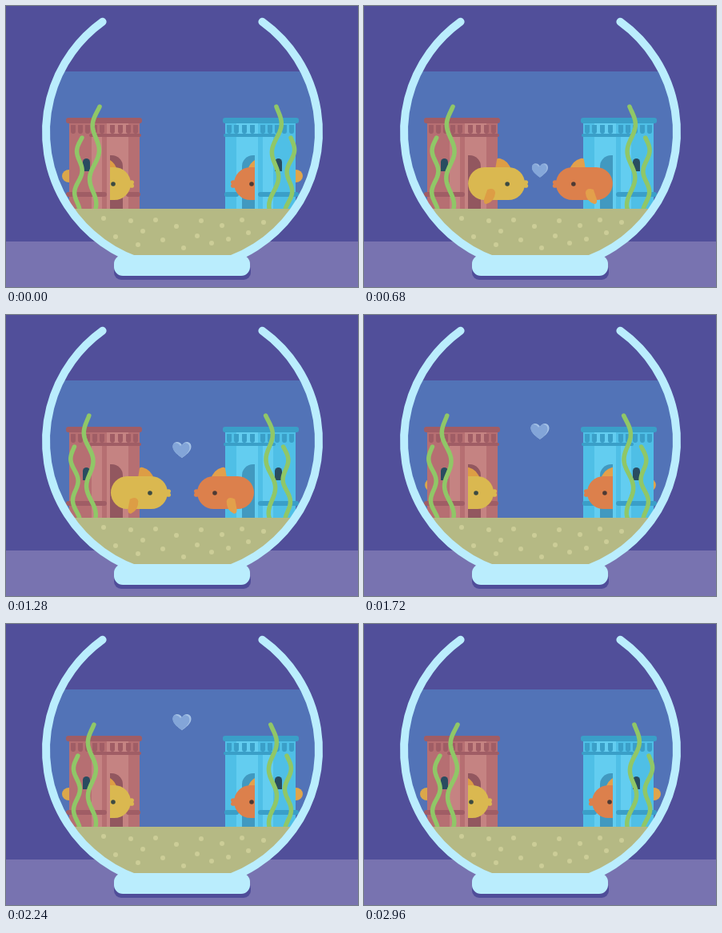
An HTML page with a canvas that plays this animation: 440x352 px, repeating every 3000 ms.

```html
<!DOCTYPE html>
<html>
<head>
<meta charset="utf-8">
<style>
html, body { margin: 0; width: 100%; height: 100%; overflow: hidden; background: #514f9a; }
canvas { display: block; }
</style>
</head>
<body>
<canvas id="stage" width="440" height="352"></canvas>
<script>
const ctx = document.getElementById('stage').getContext('2d');
const LOOP = 3000, STEP = 40, TAU = Math.PI * 2;
const BOWL = { x: 220.5, y: 158, r: 171 };
const RED = {
  wall: '#b66f72', light: '#c58382', dark: '#a05d65', door: '#92575f',
  body: '#dab850', fin: '#dd9d45', tail: '#dba74a', eye: '#3b4a42'
};
const BLUE = {
  wall: '#4fbfe6', light: '#63cdf0', dark: '#3a9fc8', door: '#4199c0',
  body: '#dc804c', fin: '#e3a04b', tail: '#dfa54b', eye: '#4d3a34'
};
const PEBBLES = [
  [122, 266], [137, 289], [156, 269], [165, 299], [171, 282], [187, 268],
  [196, 293], [213, 276], [222, 303], [239, 288], [244, 269], [257, 297],
  [270, 275], [278, 292], [295, 268], [303, 284], [322, 271]
];

const clamp = v => Math.max(0, Math.min(1, v));
const part = (t, a, b) => clamp((t - a) / (b - a));
const easeOut = x => 1 - (1 - x) ** 3;
const easeInOut = x => x < 0.5 ? 4 * x ** 3 : 1 - 4 * (1 - x) ** 3;

function rect(x, y, w, h, color) {
  ctx.fillStyle = color;
  ctx.fillRect(x, y, w, h);
}

function round(x, y, w, h, r, color) {
  ctx.fillStyle = color;
  ctx.beginPath();
  ctx.roundRect(x, y, w, h, r);
  ctx.fill();
}

function oval(x, y, rx, ry, color) {
  ctx.fillStyle = color;
  ctx.beginPath();
  ctx.ellipse(x, y, rx, ry, 0, 0, TAU);
  ctx.fill();
}

function clipTo(trace, draw) {
  ctx.save();
  ctx.beginPath();
  trace();
  ctx.clip();
  draw();
  ctx.restore();
}

function castle(c) {
  rect(79, 147, 47, 108, c.wall);
  rect(126, 147, 27, 108, c.light);
  rect(153, 147, 14, 108, c.wall);
  rect(107, 164, 13, 90, c.light);
  rect(120, 164, 6, 90, c.wall);
  for (const x of [81, 90, 99, 108, 117, 130, 140, 150, 159]) {
    round(x, 149, 6, 11, [0, 0, 3, 3], c.dark);
  }
  round(75, 140, 95, 7, 3, c.dark);
  round(104, 160, 65, 4, 2, c.dark);
  round(75, 233, 51, 6, 3, c.dark);
  round(150, 233, 18, 6, 3, c.dark);
  round(130, 187, 16, 68, [0, 14, 0, 0], c.door);
  round(96, 191, 9, 16, [4.5, 4.5, 0, 0], '#294c60');
}

// Horizontal place of the eye
function swim(t) {
  if (t < 1340) return 134 + 46 * easeOut(part(t, 0, 925));
  if (t < 1960) return 180 - 52 * easeInOut(part(t, 1340, 1960));
  return 128 + 6 * easeOut(part(t, 1960, 2300));
}

function fish(c, x, t) {
  ctx.fillStyle = c.fin;
  ctx.beginPath();
  ctx.moveTo(x - 15, 204);
  ctx.lineTo(x - 13, 192);
  ctx.quadraticCurveTo(x - 12, 190, x - 9, 191);
  ctx.quadraticCurveTo(x + 2, 194, x + 5, 206);
  ctx.fill();
  for (const dy of [-2.2, 2.2]) oval(x + 23, 223 + dy, 3, 2.6, c.body);
  round(x - 49, 202, 71, 41, 20.5, c.body);
  oval(x, 223, 2.8, 2.8, c.eye);
  ctx.save();
  ctx.translate(x - 20, 232);
  ctx.rotate(0.2 + 0.35 * Math.sin(TAU * t / 750));
  ctx.fillStyle = c.fin;
  ctx.beginPath();
  ctx.moveTo(-5, -2);
  ctx.quadraticCurveTo(4, -5, 5, 2);
  ctx.quadraticCurveTo(4, 13, -6, 16);
  ctx.quadraticCurveTo(-10, 16, -9, 10);
  ctx.fill();
  ctx.restore();
}

function home(c, t) {
  const x = swim(t);
  oval(x - 55, 213, 9, 8, c.tail);
  castle(c);
  clipTo(() => ctx.rect(130, 180, 100, 75), () => fish(c, x, t));
}

function weed(x0, top, amp, mid, wave, sway, flip) {
  ctx.beginPath();
  for (let y = top; y <= 260; y += 2) {
    const x = x0 + amp * Math.cos(TAU * (y - mid) / wave);
    const px = (flip ? 441 - x : x) + sway * (254 - y) / (254 - top);
    ctx.lineTo(px, y);
  }
  ctx.stroke();
}

function weeds(t) {
  const s = Math.cos(TAU * t / LOOP);
  ctx.strokeStyle = '#90c767';
  ctx.lineWidth = 5.5;
  ctx.lineCap = ctx.lineJoin = 'round';
  for (const flip of [false, true]) {
    weed(107.5, 126, 5, 182, 67, 7 * s, flip);
    weed(88.5, 165, 4, 207, 52, 5 * s, flip);
  }
}

function heartPath() {
  ctx.beginPath();
  ctx.moveTo(0, 10);
  ctx.bezierCurveTo(-4, 7, -11.5, 2, -11.5, -4);
  ctx.bezierCurveTo(-11.5, -11, -3, -12, 0, -6);
  ctx.bezierCurveTo(3, -12, 11.5, -11, 11.5, -4);
  ctx.bezierCurveTo(11.5, 2, 4, 7, 0, 10);
}

function heart(t) {
  const alpha = part(t, 540, 700) * (1 - part(t, 2260, 2800));
  if (!alpha) return;
  const s = t - 680, size = 0.3 + 0.7 * easeOut(part(t, 540, 860));
  ctx.save();
  ctx.globalAlpha = alpha;
  ctx.translate(220, 206 - 0.067 * s + 8.8e-6 * s * s);
  ctx.scale(size, size);
  heartPath();
  ctx.fillStyle = '#a5c2e6';
  ctx.fill();
  ctx.clip();
  ctx.translate(-2, 1.2);
  heartPath();
  ctx.fillStyle = '#83a5d8';
  ctx.fill();
  ctx.restore();
}

function draw(t) {
  rect(0, 0, 440, 352, '#514f9a');
  rect(0, 295, 440, 57, '#7873b0');
  clipTo(() => ctx.arc(BOWL.x, BOWL.y, BOWL.r, 0, TAU), () => {
    rect(0, 82, 440, 180, '#5273b7');
    home(RED, t);
    ctx.save();
    ctx.translate(441, 0);
    ctx.scale(-1, 1);
    home(BLUE, t);
    ctx.restore();
    weeds(t);
    heart(t);
    rect(0, 254, 440, 70, '#b5b984');
    for (const [x, y] of PEBBLES) oval(x, y, 3, 3, '#cccd97');
  });
  ctx.strokeStyle = '#baedfd';
  ctx.lineWidth = 10;
  ctx.lineCap = 'round';
  ctx.beginPath();
  ctx.arc(BOWL.x, BOWL.y, BOWL.r - 0.5, -0.945, Math.PI + 0.945);
  ctx.stroke();
  round(135, 322, 171, 21, 9, '#4f4d99');
  round(135, 312, 170, 26, 11, '#baedfd');
}

function frame(now) {
  draw(Math.floor(now % LOOP / STEP) * STEP);
  requestAnimationFrame(frame);
}
draw(0);
requestAnimationFrame(frame);
</script>
</body>
</html>
```
